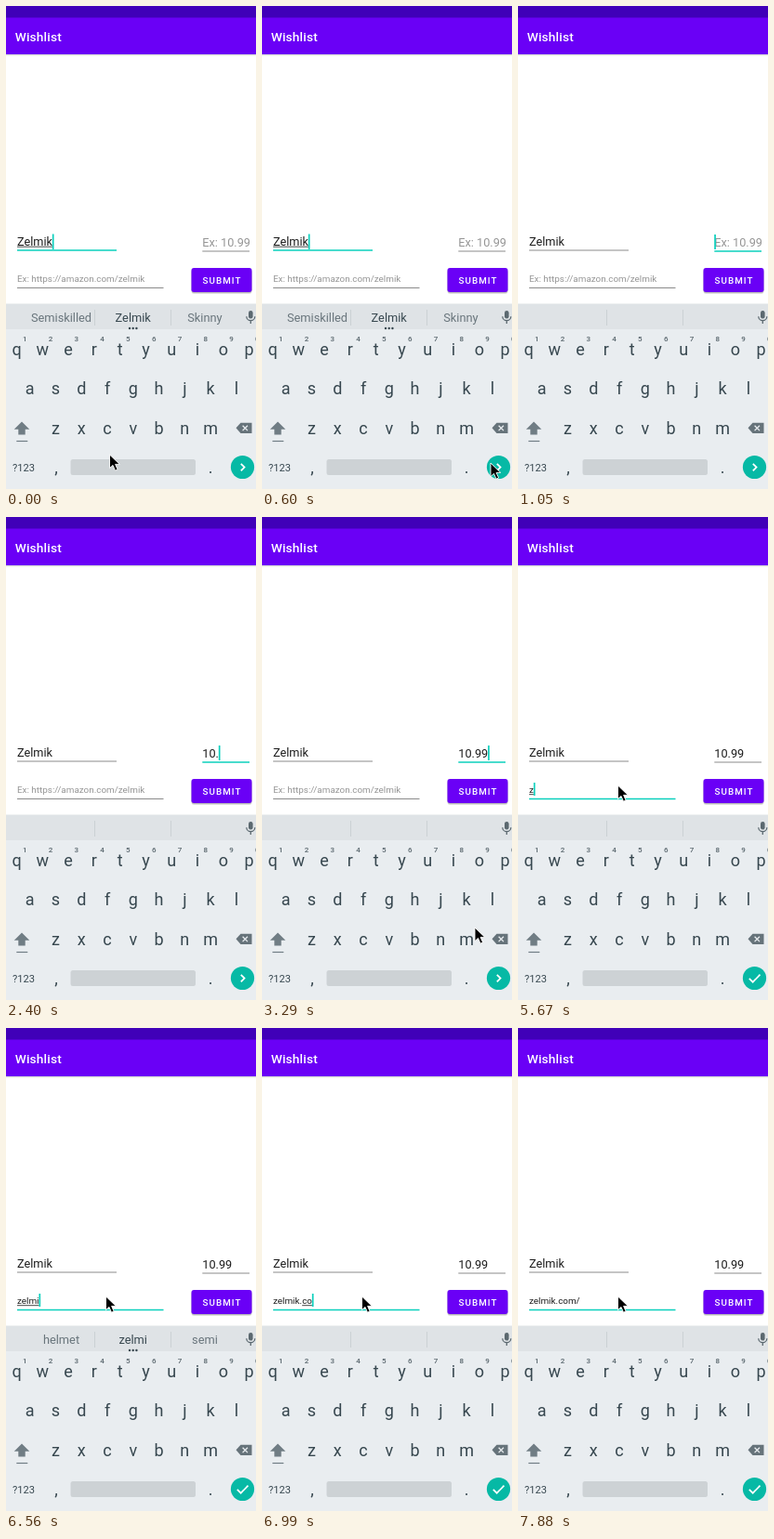
An HTML page for the animation above (8000 ms loop, 269 px wide and 520 px high).

```html
<!DOCTYPE html>
<html lang="en">
<head>
<meta charset="utf-8">
<title>Wishlist</title>
<style>
html, body { margin: 0; width: 100%; height: 100%; overflow: hidden; background: #fff; }
svg { display: block; width: 269px; height: 520px; font-family: Roboto, sans-serif; }
text { white-space: pre; }
.mid { text-anchor: middle; }
.field { font-size: 12.7px; fill: #1c1c1c; }
.url { font-size: 9.9px; }
.hint { fill: #959595; }
.word { font-size: 12.8px; fill: #69757c; }
.main { fill: #37474f; }
.key { font-size: 18px; fill: #37474f; }
.num { font-size: 8px; font-weight: 500; fill: #59666d; }
</style>
</head>
<body>
<svg id="stage" viewBox="0 0 269 520">
  <defs>
    <linearGradient id="shade" x2="0" y2="1">
      <stop stop-color="#000" stop-opacity=".2"/><stop offset="1" stop-color="#000" stop-opacity="0"/>
    </linearGradient>
    <clipPath id="priceBox"><rect x="205" y="240" width="57" height="30"/></clipPath>
  </defs>

  <rect width="269" height="13" fill="#4000b8"/>
  <rect y="12.5" width="269" height="39.5" fill="#6a00f6"/>
  <rect y="52" width="269" height="2" fill="url(#shade)"/>
  <text x="9.7" y="38" font-size="13.7" font-weight="500" letter-spacing=".17" fill="#fff">Wishlist</text>

  <g id="form"></g>
  <rect x="199.5" y="284" width="65" height="26" rx="3" fill="#000" opacity=".13"/>
  <rect x="199.5" y="283" width="65" height="26" rx="3" fill="#000" opacity=".17"/>
  <rect x="199.5" y="282" width="65" height="26" rx="2.7" fill="#6a00f6"/>
  <text class="mid" x="232.5" y="298.7" font-size="9.8" font-weight="500" letter-spacing="1.1" fill="#fff">SUBMIT</text>

  <rect y="320.5" width="269" height="28" fill="#dfe3e6"/>
  <rect y="348" width="269" height="172" fill="#e9edf0"/>
  <path d="M95.5 327v17M177.5 327v17" stroke="#cbd1d4"/>
  <g id="words"></g>
  <rect x="261" y="328" width="4.6" height="8.6" rx="2.3" fill="#5b686f"/>
  <path d="M258.8 334.2a4.5 4.5 0 0 0 9 0M263.3 338.7v3.3" fill="none" stroke="#5b686f" stroke-width="1.3"/>

  <g id="keys"></g>
  <path d="M17 447.5l8.3 8.3h-4.6v5.7h-7.4v-5.7h-4.6z" fill="#707d84"/>
  <path d="M11.3 468.5h12" stroke="#707d84" stroke-width="1.2"/>
  <path d="M252.5 448.7H264.5V460H252.5L247.5 454.3z" fill="#66737a"/>
  <path d="M254.6 451.7l5.4 5.4m0-5.4l-5.4 5.4" stroke="#e9edf0" stroke-width="1.3"/>
  <rect x="69.5" y="488" width="134.5" height="17" rx="2.5" fill="#cdd2d5"/>
  <text class="mid" x="19" y="500.5" font-size="11.1" fill="#37474f">?123</text>
  <circle cx="254.5" cy="496.5" r="12.6" fill="#06b9a5"/>
  <path id="action" fill="none" stroke="#fff" stroke-width="1.7"/>

  <path id="pointer" d="M0 0V14.6L3.5 11.4L6 17.2L8.6 16L6.1 10.4H10.8z" fill="#000" stroke="#fff" stroke-width=".9"/>
</svg>
<script>
const $ = id => document.getElementById(id);
const label = (s, x, y, cls) => `<text class="${cls}" x="${x}" y="${y}">${s}</text>`;
const LOOP = 8000, TEAL = '#0bd0bd', NAME = 'Zelmik', SITE = NAME.toLowerCase();

// Each step changes part of the state: at, {changes}
const steps = [
  [0, { focus: 'name', caret: 1, price: '', url: '', mark: 0, words: ['Semiskilled', NAME, 'Skinny'], pos: [111.5, 483] }],
  [150, { pos: [124, 483] }],
  [300, { pos: [172, 486] }],
  [450, { pos: [225, 490] }],
  [600, { pos: [246, 492] }],
  [750, { pos: [250, 493] }],
  [900, { focus: 'price', words: [] }],
  [1050, { pos: null }],
  [1500, { caret: 0 }],
  [1950, { caret: 1, price: '1' }],
  [2100, { price: '10' }],
  [2400, { price: '10.' }],
  [2700, { price: '10.9' }],
  [2850, { price: '10.99' }],
  [3140, { pos: [248, 484] }],
  [3290, { pos: [229, 442] }],
  [3440, { pos: [174, 360] }],
  [3590, { pos: [123, 305] }],
  [3740, { pos: [107.5, 289] }],
  [3880, { focus: 'url' }],
  [4180, { caret: 0 }],
  [4780, { caret: 1 }],
  [5220, { caret: 0 }],
  [5670, { caret: 1, url: SITE.slice(0, 1), mark: 1 }],
  [5820, { words: ['a', 'z', 'is'] }],
  [5970, { url: SITE.slice(0, 2), mark: 2, words: ['be', 'ze', 'he'] }],
  [6260, { url: SITE.slice(0, 3), mark: 3, words: ['tell', 'zel', 'help'] }],
  [6400, { url: SITE.slice(0, 4), mark: 4, words: ['elm', 'zelm', 'helm'] }],
  [6550, { url: SITE.slice(0, 5), mark: 5, words: ['helmet', 'zelmi', 'semi'] }],
  [6700, { url: SITE, mark: 6, words: ['helmet', SITE, 'milk'] }],
  [6850, { url: SITE + '.', mark: 0, words: [] }],
  [6990, { url: SITE + '.co', mark: 2 }],
  [7140, { url: SITE + '.com', mark: 3 }],
  [7290, { words: ['come', 'com', 'common'] }],
  [7440, { url: SITE + '.com/', mark: 0 }],
  [7580, { words: [] }],
  [7880, { caret: 0 }]
];

const fields = {
  name: { x: 12, y: 257.5, end: 119, line: 263, top: 245.5, size: 16.5, cls: 'field', hint: '' },
  price: { x: 211.3, y: 258.5, end: 262, line: 264, top: 246, size: 16, cls: 'field', hint: 'Ex: 10.99' },
  url: { x: 12, y: 297, end: 169.5, line: 303.5, top: 286, size: 14, cls: 'field url', hint: `Ex: https://amazon.com/${SITE}` }
};

$('form').innerHTML = Object.entries(fields).map(([id, f]) => `
  <path id="${id}Line" d="M${f.x} ${f.line}H${f.end}"/>
  <g ${id == 'price' ? 'clip-path="url(#priceBox)"' : ''}><text id="${id}" x="${f.x}" y="${f.y}"></text></g>
  <path id="${id}Mark" stroke="#333" stroke-width=".9"/>
  <rect id="${id}Caret" y="${f.top}" width="1.7" height="${f.size}" fill="${TEAL}"/>`).join('');

const row = (keys, x, y) => [...keys].map((k, i) => label(k, x + i * 27.77, y, 'key mid')).join('');
$('keys').innerHTML = row('qwertyuiop', 11.6, 375.5) + row('asdfghjkl', 25.7, 418) + row('zxcvbnm', 53.5, 460.5) +
  [...'1234567890'].map((n, i) => label(n, 20.3 + i * 27.77, 361, 'num mid')).join('') +
  label(',', 54, 502.5, 'key mid') + label('.', 220, 502.5, 'key mid');

function drawField(id, value, mark, s) {
  const f = fields[id], text = $(id), on = s.focus == id;
  text.textContent = value || f.hint;
  text.setAttribute('class', f.cls + (value ? '' : ' hint'));
  const width = n => n ? text.getSubStringLength(0, n) : 0;
  const end = f.x + width(value.length), start = f.x + width(value.length - mark);
  $(id + 'Mark').setAttribute('d', mark ? `M${start} ${f.y + 1.7}H${end}` : '');
  const line = $(id + 'Line');
  line.setAttribute('stroke', on ? TEAL : '#8b8b8b');
  line.setAttribute('stroke-width', on ? 1.5 : 1);
  const caret = $(id + 'Caret');
  caret.setAttribute('x', end - .1);
  caret.style.display = on && s.caret ? '' : 'none';
}

function draw(s) {
  drawField('name', NAME, s.focus == 'name' ? NAME.length : 0, s);
  drawField('price', s.price, 0, s);
  drawField('url', s.url, s.mark, s);
  const dots = [133, 136.7, 140.4].map(x => `<circle cx="${x}" cy="347" r="1.2" fill="#37474f"/>`).join('');
  $('words').innerHTML = s.words.map((w, i) => label(w, 59.5 + i * 77.2, 340, 'word mid' + (i == 1 ? ' main' : ''))).join('') +
    (s.words.length ? dots : '');
  $('action').setAttribute('d', s.focus == 'url' ? 'M248.8 496.8l3.9 3.9l7.8-8' : 'M252.8 492.8l3.8 3.8l-3.8 3.8');
  const p = $('pointer');
  p.style.display = s.pos ? '' : 'none';
  if (s.pos) p.setAttribute('transform', `translate(${s.pos})`);
}

let shown = 0;
function tick() {
  const t = performance.now() % LOOP;
  const past = steps.filter(([at]) => at <= t);
  if (past.length != shown) {
    shown = past.length;
    draw(Object.assign({}, ...past.map(step => step[1])));
  }
  requestAnimationFrame(tick);
}
tick();
</script>
</body>
</html>
```
